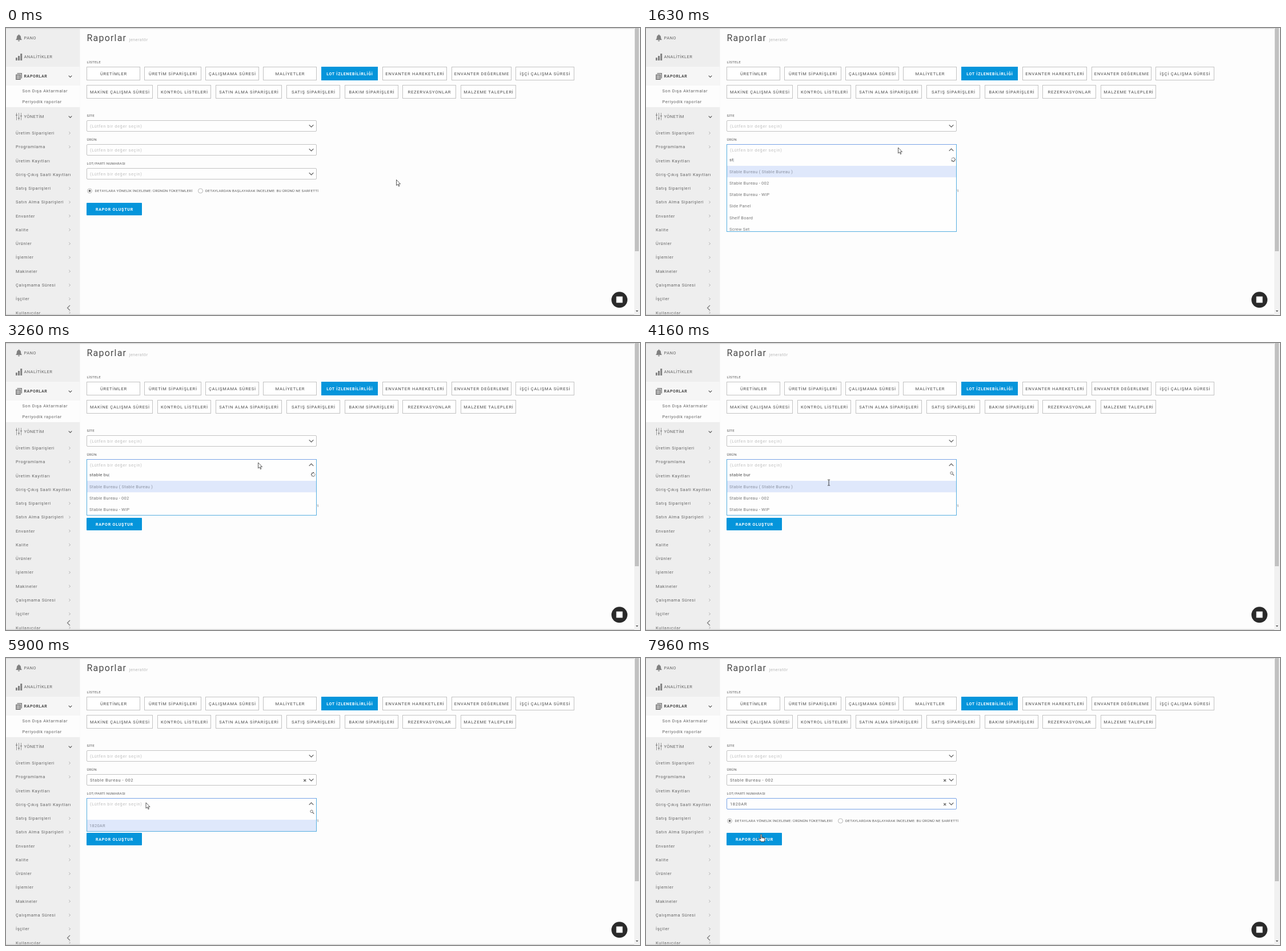
Animation, 1110 px wide and 504 px high, one loop 8 s. Source, as an HTML page:

```html
<!DOCTYPE html>
<html lang="tr">
<head>
<meta charset="utf-8">
<title>Raporlar</title>
<style>
html, body { margin: 0; width: 100%; height: 100%; overflow: hidden; background: #fdfdfd; }
svg { display: block; width: 1110px; height: 504px; font-family: Roboto, "Noto Sans", sans-serif; }
text { white-space: pre; fill: #646464; font-size: 7.5px; letter-spacing: .6px; }
.title { font-size: 16px; letter-spacing: 1.2px; fill: #4a4a4a; }
.hint { letter-spacing: .4px; fill: #bbb; }
.head { letter-spacing: .4px; }
.on { font-size: 7px; font-weight: 700; letter-spacing: .6px; fill: #4a4a4a; }
.label { font-size: 6.2px; letter-spacing: .27px; fill: #555; }
.btn { letter-spacing: .8px; fill: #4a4a4a; text-anchor: middle; }
.hot { font-size: 7px; font-weight: 700; fill: #fff; }
.empty { fill: #c0c0c0; }
.opt { letter-spacing: .25px; fill: #777; }
.picked { fill: #8b92a2; }
.query { font-size: 8px; letter-spacing: .15px; fill: #555; }
</style>
</head>
<body>
<svg viewBox="0 0 1110 504"><g id="page"></g><g id="live"></g></svg>
<script>
const LOOP = 8000, BLUE = '#0595db', FOCUS = '#79a3e6', EDGE = '#c2c2c2';
const NAME = 'Stable Bureau';
const EMPTY = '(Lütfen bir değer seçin)';
const SIZES = { title: 16, label: 6.2, on: 7, query: 8 };

const text = (x, cy, s, cls = '') =>
  `<text x="${x}" y="${cy + .36 * (SIZES[cls] || 7.5)}" class="${cls}">${s}</text>`;
const rect = (x, y, w, h, fill, more = '') =>
  `<rect x="${x}" y="${y}" width="${w}" height="${h}" fill="${fill}" ${more}/>`;
const line = (d, color = '#444', w = 1.2) =>
  `<path d="${d}" fill="none" stroke="${color}" stroke-width="${w}"/>`;
const chevron = (x, y, dir = 1, r = 3.8) =>
  line(`M${x - r} ${y - dir * r / 2}l${r} ${dir * r} ${r} ${-dir * r}`, '#555', 1.1);

function sidebar() {
  const items = ['Üretim Siparişleri', 'Programlama', 'Üretim Kayıtları', 'Giriş-Çıkış Saati Kayıtları',
    'Satış Siparişleri', 'Satın Alma Siparişleri', 'Envanter', 'Kalite', 'Ürünler', 'İşlemler',
    'Makineler', 'Çalışmama Süresi', 'İşçiler', 'Kullanıcılar'];
  let s = rect(0, 0, 129.5, 504, '#eeeeee') + rect(0, 68, 129.5, 33, '#f6f6f6') + rect(0, 101, 129.5, 38, '#fdfdfd');
  // bell, bars, document, sliders
  s += '<g fill="#808080"><path d="M17 21q2-2 2-5 0-3 2.6-3.5v-1h1.8v1q2.6.5 2.6 3.5 0 3 2 5zM20.7 21.8h3.6q-.4 1.7-1.8 1.7t-1.8-1.7"/>';
  s += '<path d="M17 57v-5h2.8v5zM21 57v-8h3v8zM25.2 57V45h3v12z"/>';
  s += '<path d="M19.5 79H28v9.5h-1.5V80.5h-7zM17 81.5h8.7V91H17z"/></g>';
  s += line('M18.5 84h5.7M18.5 86.2h5.7M18.5 88.4h5.7', '#f6f6f6', .9);
  s += line('M18.5 149v13M22.5 149v13M26.5 149v13', '#999', 1);
  s += line('M17 153h3M21 158.5h3M25 154.5h3', '#888', 1.5);
  s += text(31.5, 17, 'PANO', 'head') + text(31.5, 50.5, 'ANALİTİKLER', 'head');
  s += text(31.5, 84.5, 'RAPORLAR', 'on') + text(31.5, 155.5, 'YÖNETİM', 'head');
  s += chevron(112.5, 85, 1, 2.8) + chevron(112.5, 156, 1, 2.8);
  s += text(28.5, 110.5, 'Son Dışa Aktarmalar') + text(28.5, 129.3, 'Periyodik raporlar');
  items.forEach((item, i) => {
    const y = 184.3 + 24.27 * i;
    s += text(17, y, item);
    if (i !== 2 && i !== 3) s += line(`M110.3 ${y - 2}l2.2 2.2-2.2 2.2`, '#999', .8);
  });
  return s + line('M112 487l-4.5 4.5 4.5 4.5', '#808080', 1.4);
}

function buttonRow(y, row) {
  return row.map(([x, right, s, hot]) =>
    rect(x + .5, y + .5, right - x - 1, 23, hot ? BLUE : '#fff', `stroke="${hot ? BLUE : EDGE}"`) +
    text((x + right) / 2 + .4, y + 12.2, s, hot ? 'btn hot' : 'btn')).join('');
}

function page() {
  let s = sidebar() + text(141.5, 17.5, 'Raporlar', 'title') + text(215.5, 20.5, 'jeneratör', 'hint');
  s += text(141.5, 59.5, 'LİSTELE', 'label');
  s += buttonRow(68, [[141, 235, 'ÜRETİMLER'], [242, 342, 'ÜRETİM SİPARİŞLERİ'], [349, 443, 'ÇALIŞMAMA SÜRESİ'],
    [450, 544, 'MALİYETLER'], [552, 651, 'LOT İZLENEBİLİRLİĞİ', 1], [659, 772, 'ENVANTER HAREKETLERİ'],
    [780, 885, 'ENVANTER DEĞERLEME'], [892, 995, 'İŞÇİ ÇALIŞMA SÜRESİ']]);
  s += buttonRow(100, [[141, 257, 'MAKİNE ÇALIŞMA SÜRESİ'], [265, 359, 'KONTROL LİSTELERİ'],
    [367, 483, 'SATIN ALMA SİPARİŞLERİ'], [491, 585, 'SATIŞ SİPARİŞLERİ'], [593, 687, 'BAKIM SİPARİŞLERİ'],
    [694, 788, 'REZERVASYONLAR'], [796, 893, 'MALZEME TALEPLERİ']]);
  s += text(141.5, 153.3, 'SİTE', 'label') + text(141.5, 195.5, 'ÜRÜN', 'label') + text(141.5, 237.7, 'LOT/PARTİ NUMARASI', 'label');
  for (const x of [146.5, 340.5]) s += `<circle cx="${x}" cy="286" r="4" fill="#fff" stroke="#a5a5a5" stroke-width=".8"/>`;
  s += '<circle cx="146.5" cy="286" r="2" fill="#666"/>';
  s += text(155.5, 286.2, 'DETAYLARA YÖNELİK İNCELEME: ÜRÜNÜN TÜKETİMLERİ', 'label');
  s += text(349, 286.2, 'DETAYLARDAN BAŞLAYARAK İNCELEME: BU ÜRÜNÜ NE SARFETTİ', 'label');
  s += rect(141, 307, 97, 22, BLUE, 'rx="1"') + text(190, 318.7, 'RAPOR OLUŞTUR', 'btn hot');
  // window edges, scrollbar, chat button
  s += rect(0, 0, 1110, 1.5, '#d5d5d5') + rect(0, 502.5, 1110, 1.5, '#d5d5d5');
  s += rect(1100, 0, 10, 504, '#f1f1f1') + rect(1101, 0, 7, 392, '#c1c1c1');
  s += '<path d="M1102.5 496h4.5l-2.2 2.5z" fill="#555"/>';
  s += '<circle cx="1074" cy="477.3" r="14" fill="#2a2a2a"/>' + rect(1068.5, 471.5, 11, 11, '#fff');
  return s;
}

const between = (t, spans) => spans.some(([a, b]) => t >= a && t < b);

// Each picker: row position, open span, time the results arrive, key times and search spans.
const pickers = [
  { y: 204.5, open: 930, shut: 4660, ready: 1430, blur: 5330, value: NAME + ' - 002', query: 'stable bur',
    keys: [1430, 1620, 2000, 2120, 2280, 2600, 2750, 2860, 3200, 3430],
    busy: [[930, 1430], [1600, 1860], [2000, 2250], [2600, 2800], [2860, 3060], [3200, 3500]],
    options: [`${NAME} ( ${NAME} )`, NAME + ' - 002', NAME + ' - WIP'], first: 242 },
  { y: 246.5, open: 5330, shut: 7800, ready: 5560, blur: LOOP, value: '1820AR', query: '1820',
    keys: [5960, 6130, 6300, 6450],
    busy: [[5330, 5560], [6100, 6560], [6700, 6850]],
    options: ['1820AR'], first: 284 }
];
const extra = ['Side Panel', 'Shelf Board', 'Screw Set'];
const NARROWED = 2180;

function spinner(x, y, t) {
  let s = '';
  for (let i = 0; i < 8; i++) {
    const a = i * Math.PI / 4, fade = 1 - ((Math.floor(t / 60) - i) & 7) / 10;
    s += `<circle cx="${x + 3.2 * Math.cos(a)}" cy="${y + 3.2 * Math.sin(a)}" r="1" fill="#333" opacity="${fade}"/>`;
  }
  return s;
}

function dropdown(p, t, pointer) {
  const loading = t < p.ready, wide = p.first < 250 && t < NARROWED;
  const options = loading ? [] : wide ? p.options.concat(extra) : p.options;
  const end = loading ? p.y + 48.5 : wide ? 357 : p.first + 20.2 * options.length;
  const bottom = Math.floor(end) + .5;
  const row = p.y + (p.first < 250 ? 26.5 : 25.5);
  const active = pointer.y > p.first + 20 && options.length > 1 && t > 4160 ? 1 : 0;
  let s = rect(141.5, p.y, 402, bottom - p.y, '#fefefe');
  s += `<clipPath id="list">${rect(142, p.first, 401, Math.max(0, bottom - p.first), '#000')}</clipPath><g clip-path="url(#list)">`;
  options.forEach((o, i) => {
    const y = p.first + 20.2 * i;
    if (i === active) s += rect(142, y, 401, 20.2, '#dfe8fb');
    s += text(146, y + 10, o, i === active ? 'opt picked' : 'opt');
  });
  s += '</g>' + rect(141.5, p.y, 402, bottom - p.y, 'none', 'stroke="#56aee0"');
  s += line(`M142.5 ${p.y}H542.5`, FOCUS, 1);

  const pressed = p.keys.filter(k => k <= t);
  const last = pressed.length ? pressed[pressed.length - 1] : p.open;
  const caret = (t - last) % 1060 < 530 ? '<tspan fill="#7f93a5" font-weight="300" dx="-.6">|</tspan>' : '';
  s += text(146, row, p.query.slice(0, pressed.length) + caret, 'query');
  s += between(t, p.busy) ? spinner(538, row, t)
    : `<circle cx="535" cy="${row - 2.7}" r="2.2" fill="none" stroke="#666" stroke-width=".9"/>` +
      line(`M536.7 ${row - 1}l2.6 2.6`, '#666', 1.2);
  return s;
}

function picker(p, t, pointer) {
  const open = t >= p.open && t < p.shut, chosen = t >= p.shut;
  const focused = chosen && t < p.blur;
  let s = open ? dropdown(p, t, pointer)
    : rect(141.5, p.y, 402, 19, '#fefefe', `rx="1.5" stroke="${focused ? FOCUS : EDGE}"`);
  s += text(147, p.y + 9.3, chosen ? p.value : EMPTY, chosen ? '' : 'empty');
  if (chosen) s += line(`M521.2 ${p.y + 8.5}l4 4m0-4l-4 4`, '#666', 1.1);
  return s + chevron(534.5, p.y + 9.5, open ? -1 : 1);
}

// time, x, y and the shape worn from that time on
const path = [
  [0, 683.5, 266.5, 'arrow'], [330, 683.5, 266.5, 'arrow'], [930, 441.5, 210, 'arrow'], [3900, 441.5, 210, 'arrow'],
  [4000, 395, 227, 'beam'], [4160, 320.5, 245, 'beam'], [4210, 300, 253, 'hand'], [4430, 254, 271.5, 'hand'],
  [4960, 254, 271.5, 'hand'], [5040, 248, 265, 'arrow'], [5160, 243, 259.5, 'arrow'], [5300, 243, 259.5, 'arrow'],
  [5330, 245, 254, 'arrow'], [6700, 245, 254, 'arrow'], [6950, 247, 266, 'beam'], [7250, 249, 284, 'hand'],
  [7500, 250, 289, 'hand'], [7600, 250, 291, 'hand'], [7800, 250, 291, 'hand'], [7830, 240, 295, 'arrow'],
  [7930, 206, 307.5, 'hand'], [7960, 201.5, 309.5, 'hand'], [LOOP, 201.5, 309.5, 'hand']
];
const shapes = {
  arrow: '<path d="M0 0V10L2.3 7.9 4 11.6 5.4 11 3.8 7.4H7Z" fill="#fff" stroke="#333" stroke-width=".8"/>',
  beam: line('M-2-5h1.3l.7.6.7-.6H2M0-4.4V4.4M-2 5h1.3l.7-.6.7.6H2', '#222', .9),
  hand: '<path d="M-1 1q0-1 1-1t1 1V5l4 1q1.7.5 1.7 2v2l-1 3.2h-5.5L-4 8.6q-.4-1.6 1.2-1.2L-1 8.5Z" fill="#fff" stroke="#222" stroke-width=".9"/>' +
    line('M1 5v2.5M2.9 5.6v2M4.8 6.2v1.6', '#222', .7)
};

function pointerAt(t) {
  const i = path.findIndex(k => k[0] > t);
  const [t0, x0, y0, shape] = path[i - 1], [t1, x1, y1] = path[i];
  let u = (t - t0) / (t1 - t0);
  if (t1 - t0 > 400) u = u * u * (3 - 2 * u);
  return { x: x0 + (x1 - x0) * u, y: y0 + (y1 - y0) * u, shape };
}

const live = document.getElementById('live');
document.getElementById('page').innerHTML = page();
const site = picker({ y: 162.5, open: LOOP, shut: LOOP }, 0);

function draw(now) {
  const t = now % LOOP, m = pointerAt(t);
  const [product, lot] = pickers;
  // the open list covers whatever lies below it
  const order = t < product.shut ? [lot, product] : [product, lot];
  live.innerHTML = site + order.map(p => picker(p, t, m)).join('') +
    `<g transform="translate(${m.x} ${m.y})">${shapes[m.shape]}</g>`;
}

const start = performance.now();
function tick() {
  draw(performance.now() - start);
  requestAnimationFrame(tick);
}
tick();
</script>
</body>
</html>
```
